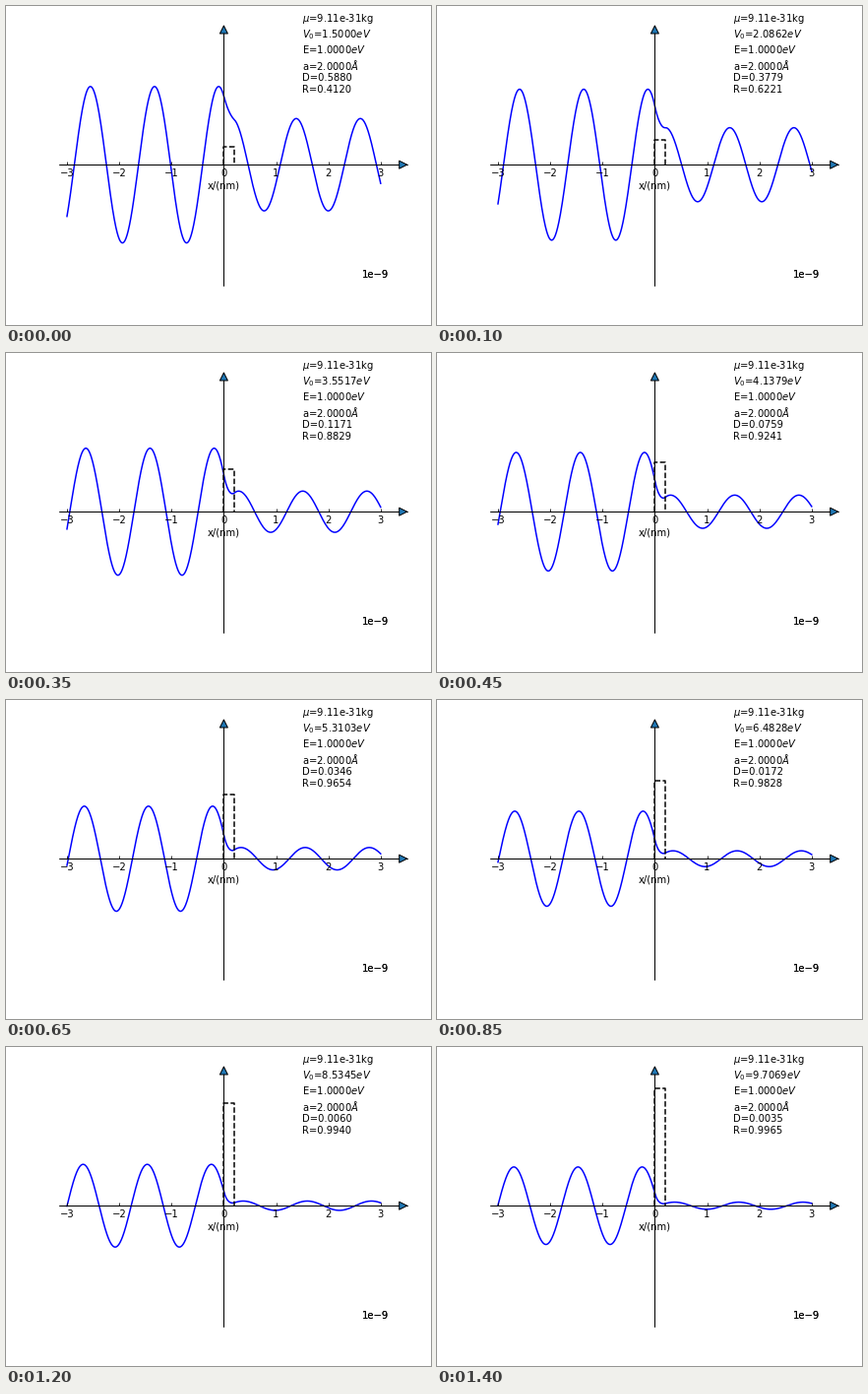
Write a matplotlib script that moves like this. It is 432 px wide and 324 px high and loops after 1450 ms.

```python
import numpy as np
import matplotlib.pyplot as plt
from matplotlib.animation import FuncAnimation
from mpl_toolkits import axisartist

HBAR = 1.055e-34   # J s
EV = 1.602e-19     # J
MASS = 9.11e-31    # kg
ENERGY = 1.0       # eV
WIDTH = 2e-10      # barrier width, m
AMPLITUDE = 5      # incident wave
STEPS = 29

barrier_heights = np.linspace(1.5, 10, STEPS + 1)[:STEPS]
x = np.linspace(-3e-9, 3e-9, 1201)


def wave_number(energy):
    return np.sqrt(2 * MASS * energy * EV) / HBAR


def scatter(v0):
    """Real part of the wave over x, and the transmission probability."""
    k, q = wave_number(ENERGY), wave_number(v0 - ENERGY)
    sinh, cosh = np.sinh(q * WIDTH), np.cosh(q * WIDTH)
    exit_value = 1 / (cosh + 1j * (q**2 - k**2) / (2 * k * q) * sinh)
    r = -1j * (q**2 + k**2) / (2 * k * q) * sinh * exit_value

    d = x - WIDTH
    inside = np.clip(d, -WIDTH, 0)
    left = np.exp(1j * k * x) + r * np.exp(-1j * k * x)
    middle = exit_value * (np.cosh(q * inside) + 1j * k / q * np.sinh(q * inside))
    right = exit_value * np.exp(1j * k * d)
    psi = np.where(x < 0, left, np.where(d < 0, middle, right))
    return AMPLITUDE * psi.real, abs(exit_value)**2


fig = plt.figure(figsize=(6, 4.5), dpi=72, facecolor="white")
fig.subplots_adjust(left=0.125, right=0.9, bottom=0.125, top=0.88)
ax = fig.add_subplot(axes_class=axisartist.Axes)
ax.set_xlim(-3.15e-9, 3.15e-9)
ax.set_ylim(-10, 10)
ax.set_yticks([])

ax.axis[:].set_visible(False)
for coord, name in enumerate("xy"):
    ax.axis[name] = ax.new_floating_axis(coord, 0)
    ax.axis[name].set_axisline_style("-|>", size=2.0)
    ax.axis[name].line.set_facecolor("C0")
ax.axis["x"].label.set_text("x/(nm)")

wave, = ax.plot([], [], "b-", lw=1.5)
barrier, = ax.plot([], [], "k--", lw=1.5)
info = ax.text(1.5e-9, 6, "", fontsize=10)


def update(step):
    v0 = barrier_heights[step]
    psi, transmitted = scatter(v0)
    wave.set_data(x, psi)
    barrier.set_data([0, 0, WIDTH, WIDTH], [0, v0, v0, 0])
    info.set_text("\n".join([
        r"$\mu$=9.11e-31kg",
        f"$V_0$={v0:.4f}$eV$",
        f"E={ENERGY:.4f}$eV$",
        f"a={WIDTH * 1e10:.4f}" + r"$\AA$",
        f"D={transmitted:.4f}",
        f"R={1 - transmitted:.4f}",
    ]))
    return wave, barrier, info


anim = FuncAnimation(fig, update, frames=STEPS, interval=50,
                     repeat=True, repeat_delay=0, blit=False)
plt.show()
```
